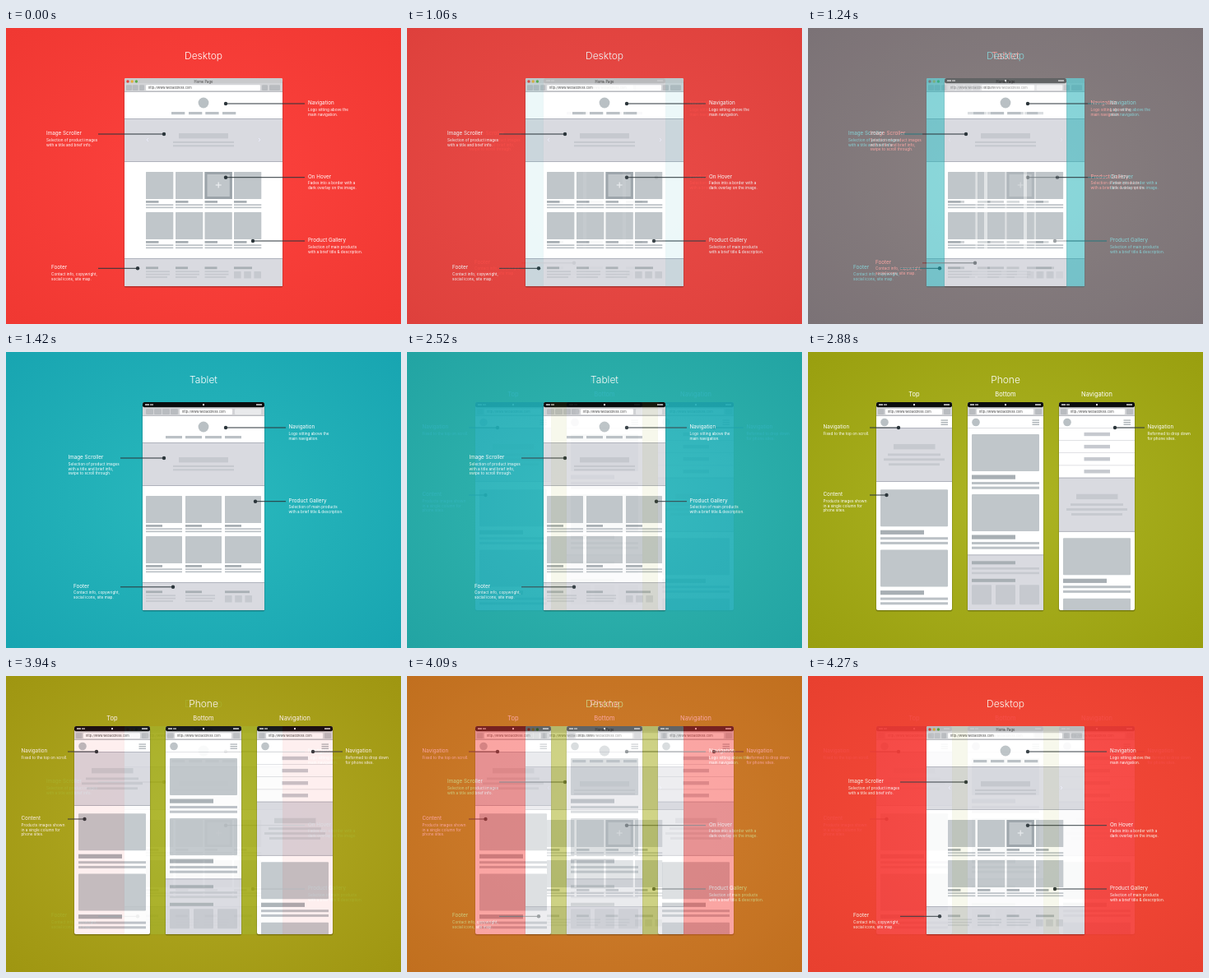
Write an HTML page that moves like this. It is 480x360 px and loops after 4300 ms.

```html
<!DOCTYPE html>
<html>
<head>
<meta charset="utf-8">
<style>
html, body { margin: 0; width: 100%; height: 100%; overflow: hidden; }
svg { display: block; width: 480px; height: 360px; font-family: Inter, "Open Sans", sans-serif; }
</style>
</head>
<body>
<svg id="stage" viewBox="0 0 480 360"></svg>
<script>
const PANEL = '#d9dae0', EDGE = '#a6a9b3', THUMB = '#c0c6ca', TITLE = '#a8afb4',
  LINE = '#bbc1c6', SOFT = '#c6c9cf', INK = '#2b353a';

const rect = (x, y, w, h, fill, r = 0) =>
  `<rect x="${x}" y="${y}" width="${w}" height="${h}" rx="${r}" fill="${fill}"/>`;
const dot = (x, y, r, fill) => `<circle cx="${x}" cy="${y}" r="${r}" fill="${fill}"/>`;
const text = (x, y, size, str, fill = '#fff', anchor = 'start', weight = 400) =>
  `<text x="${x}" y="${y}" font-size="${size}" fill="${fill}" text-anchor="${anchor}" font-weight="${weight}">${str}</text>`;
const each = (list, fn) => list.map(fn).join('');

// Coloured backdrop with a soft glow and the device name
const backdrop = (id, inner, outer, name) => `
  <radialGradient id="${id}" cx=".5" cy=".5" r=".7">
    <stop offset="0" stop-color="${inner}"/><stop offset="1" stop-color="${outer}"/>
  </radialGradient>` + rect(0, 0, 480, 360, `url(#${id})`) +
  text(240, 38.4, 12, name, '#fff', 'middle', 300);

const page = (x, w) =>
  rect(x - .5, 64, w + 1, 251.5, 'rgba(0,0,0,.25)', 2) + rect(x, 61, w, 253, '#fff', 2);

// Full-width grey section with hairlines
const band = (x, y, w, h, closed = true) =>
  rect(x, y, w, h, PANEL) + rect(x, y, w, .8, EDGE) + (closed ? rect(x, y + h - .8, w, .8, EDGE) : '');

const address = (x, w) => rect(x, 69.2, w, 6.8, '#fff', 1) +
  text(x + 3, 74, 3.85, 'http://www.webaddress.com', '#444');

const toolbar = (x, w) => rect(x, 67, w, 11, '#d3d4d7') + rect(x, 77.4, w, .6, '#aaadb2');
const button = (x, w) => rect(x, 69.2, w, 6.8, '#b9bcc0', 1);

const statusBar = (x, w) => rect(x, 61, w, 6.2, '#0b0d0e', 2) +
  rect(x + 3, 63.3, 5, 1.6, '#ccc') + rect(x + 9, 63.3, 4, 1.6, '#aaa') +
  rect(x + w / 2 - 1, 63, 2, 2.2, '#ddd') + rect(x + w - 10, 63.3, 7, 1.6, '#ccc');

// Line from the label to a dot on the page; y is the middle of the heading
const callout = (x, y, from, to, dotY, head, lines) =>
  rect(Math.min(from, to), dotY - .5, Math.abs(to - from), 1, INK) + dot(to, dotY, 2.2, INK) +
  text(x, y + 2.2, 6.3, head) + each(lines, (s, i) => text(x, y + 9.7 + i * 5.8, 4.7, s));

const navBars = (xs, w) => dot(240, 91, 6.4, '#b9c0c4') + each(xs, x => rect(x, 102, w, 3.2, LINE));

const hero = (x, w) => band(x, 110, w, 53) + rect(210, 128, 60, 6.4, SOFT) +
  rect(203, 137.8, 74, 2.2, SOFT) + rect(203, 142.2, 74, 2.2, SOFT);

const item = (x, y, w, titleW) => rect(x, y, w, 33, THUMB, .6) + rect(x, y + 35, titleW, 2.8, TITLE) +
  rect(x, y + 39.3, w, 1.7, LINE) + rect(x, y + 42.5, w, 1.7, LINE);

const gallery = (xs, w, titleW) => each([175, 224], y => each(xs, x => item(x, y, w, titleW)));

const footer = (x, w, cols, titleW, lineW, lastTitle) => {
  const last = cols[cols.length - 1];
  return band(x, 280, w, 34, false) +
    each(cols.slice(0, -1), c => rect(c, 290.4, titleW, 2.8, TITLE) +
      each([295.3, 298.7, 302.1], (y, i) => rect(c, y, i == 2 ? lineW - 3 : lineW, 1.8, SOFT))) +
    rect(last, 290.4, lastTitle, 2.8, TITLE) +
    each([0, 12.2, 24.4], d => rect(last + d, 296, 8.6, 8.6, SOFT, .6));
};

function desktop() {
  const cols = [170, 206, 241.5, 277];
  return backdrop('red', '#fd423e', '#f03832', 'Desktop') + page(144, 192) +
    rect(144, 61, 192, 10, '#c9cacc', 2) + toolbar(144, 192) +
    each(['#e0443c', '#e5b13a', '#5aae48'], (c, i) => dot(148 + i * 5.2, 65, 1.7, c)) +
    text(240, 66.8, 4.2, 'Home Page', '#444', 'middle') +
    button(146, 7) + button(153.6, 7) + button(162, 6) + address(170, 139) + button(311, 7) + button(320, 13) +
    navBars([201, 222, 242.3, 263], 16.3) + hero(144, 192) +
    `<path d="M173 134l-2 2 2 2M307 134l2 2-2 2" fill="none" stroke="#eef" stroke-width=".8"/>` +
    gallery(cols, 33.3, 15.5) +
    `<rect x="243" y="176.5" width="30.3" height="30" fill="none" stroke="#9ca4aa" stroke-width="3"/>` +
    rect(254.7, 190.4, 7, 1.2, '#eceef0') + rect(257.6, 187.5, 1.2, 7, '#eceef0') +
    footer(144, 192, cols, 15, 29, 22) +
    callout(367, 91, 363, 267, 92, 'Navigation', ['Logo sitting above the', 'main navigation.']) +
    callout(49, 128, 112, 192, 129, 'Image Scroller', ['Selection of product images', 'with a title and brief info.']) +
    callout(367, 180.7, 363, 267, 181.7, 'On Hover', ['Fades into a border with a', 'dark overlay on the image.']) +
    callout(367, 258, 363, 300, 259, 'Product Gallery', ['Selection of main products', 'with a brief title &amp; description.']) +
    callout(55, 291, 112, 160, 292.3, 'Footer', ['Contact info, copywright,', 'social icons, site map.']);
}

function tablet() {
  const cols = [170, 218, 266];
  return backdrop('teal', '#2ab9bd', '#18a5b1', 'Tablet') + page(166, 148) +
    toolbar(166, 148) + statusBar(166, 148) +
    each([170, 180, 190, 200], x => button(x, 9)) + address(211, 64) + rect(278, 69.2, 32, 6.8, '#e9eaec', 1) +
    navBars([194, 218, 242, 266], 20) + hero(166, 148) + gallery(cols, 44, 20) +
    footer(166, 148, cols, 20, 36, 30) +
    callout(343.5, 91, 340, 267, 92, 'Navigation', ['Logo sitting above the', 'main navigation.']) +
    callout(75.5, 128, 139, 192, 129, 'Image Scroller', ['Selection of product images', 'with a title and brief info,', 'swipe to scroll through.']) +
    callout(343.5, 180.7, 340, 303, 181.7, 'Product Gallery', ['Selection of main products', 'with a brief title &amp; description.']) +
    callout(82, 284.5, 139, 203, 285.8, 'Footer', ['Contact info, copywright,', 'social icons, site map.']);
}

const handset = (x, name, body) => text(x + 46, 53.5, 7.5, name, '#fff', 'middle') + page(x, 92) +
  `<g clip-path="url(#screen)">${body}</g>` + toolbar(x, 92) + statusBar(x, 92) +
  button(x + 2, 7.5) + address(x + 11, 69) + button(x + 82, 8) +
  dot(x + 10, 85.5, 4.8, '#b9c0c4') + each([82.4, 85, 87.6], y => rect(x + 78.5, y, 8.5, 1.3, '#a8afb4'));

const card = (x, y) => rect(x + 5, y, 82, 45, THUMB, 1) + rect(x + 5, y + 49.5, 53, 5.2, TITLE) +
  rect(x + 5, y + 58, 82, 3, LINE) + rect(x + 5, y + 63.7, 82, 3, LINE);

const smallHero = (x, y) => band(x, y, 92, 66) + rect(x + 21, y + 20, 50.5, 6.4, SOFT) +
  each([64, 74, 62], (w, i) => rect(x + 46 - w / 2, y + 31.5 + i * 5.9, w, 2.8, SOFT));

function phone() {
  const end = 194 + 5;
  return backdrop('olive', '#adb524', '#999f0f', 'Phone') +
    `<clipPath id="screen"><rect y="61" width="480" height="253"/></clipPath>` +
    handset(83, 'Top', smallHero(83, 92) + card(83, 167.2) + card(83, 240.6)) +
    handset(194, 'Bottom', rect(194, 92, 92, .6, '#ccced3') + card(194, 100) + card(194, 173) +
      band(194, 246.5, 92, 68, false) + rect(end, 254.3, 53, 4, TITLE) +
      rect(end, 262, 82, 2.6, SOFT) + rect(end, 267.6, 82, 2.6, SOFT) + rect(end, 275.8, 53, 4, TITLE) +
      each([0, 29, 58], d => rect(end + d, 283.3, 24, 24, SOFT, 1))) +
    handset(305, 'Navigation', each([0, 1, 2, 3], i =>
        rect(305, 92 + i * 15.2, 92, .6, '#ccced3') + rect(335.5, 97.8 + i * 15.1, 31.5, 4.4, SOFT)) +
      smallHero(305, 152.7) + card(305, 226.2) + card(305, 299.8)) +
    callout(18.5, 91, 75, 110, 92, 'Navigation', ['Fixed to the top on scroll.']) +
    callout(18.5, 173, 75, 95.5, 174, 'Content', ['Products images shown', 'in a single column for', 'phone sites.']) +
    callout(412.5, 91, 409, 373, 92, 'Navigation', ['Reformed to drop down', 'for phone sites.']);
}

const stage = document.getElementById('stage');
stage.innerHTML = each([desktop, tablet, phone], scene => `<g>${scene()}</g>`);
const [, tabletLayer, phoneLayer] = stage.children;

// Cross-fade in 13 steps of 30 ms
const fade = (t, start) => Math.max(0, Math.min(13, Math.floor((t - start) / 30) + 1)) / 13;

function tick() {
  const t = performance.now() % 4300;
  tabletLayer.setAttribute('opacity', t < 3940 ? fade(t, 1060) : 0);
  phoneLayer.setAttribute('opacity', t < 3940 ? fade(t, 2520) : 1 - fade(t, 3940));
  requestAnimationFrame(tick);
}
tick();
</script>
</body>
</html>
```
